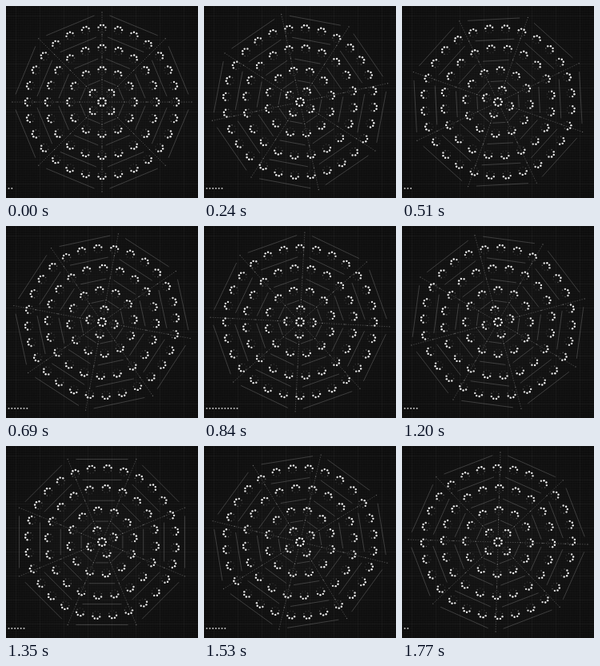
An HTML page with a canvas that plays this animation: 240x240 px, repeating every 1.8 s.

```html
<!DOCTYPE html>
<html lang="en">
<head>
<meta charset="utf-8">
<title>Octagon of spinners</title>
<style>
  html, body { margin: 0; width: 100%; height: 100%; overflow: hidden; background: #111; }
  canvas { display: block; width: 100vw; height: 100vh; }
</style>
</head>
<body>
<canvas id="stage"></canvas>
<script>
const SIZE = 240, MID = 120, LOOP = 1800, STEP = 30, TAU = Math.PI * 2;
const canvas = document.getElementById('stage');
const ctx = canvas.getContext('2d');
const scale = window.devicePixelRatio || 1;
canvas.width = canvas.height = SIZE * scale;

// Spinner rings: radius, number of spinners, starting angle.
const RINGS = [
  { r: 15, n: 4, start: TAU / 8 },
  { r: 39, n: 12, start: 0 },
  { r: 66.5, n: 20, start: 0 },
  { r: 91.5, n: 28, start: 0 }
];
const WEB = [28, 56, 84, 112];

// Drift of the outer ring in spinner spacings, and length of the dotted bar.
const DRIFT = [[0, 0], [240, .32], [510, .46], [840, 1], [1200, 1.18], [1530, 1.54], [1800, 2]];
const BAR = [[0, 2], [240, 6], [510, 3], [840, 11], [1200, 5], [1530, 7], [1770, 2], [1800, 2]];

function sample(table, t) {
  const i = table.findIndex(row => row[0] > t);
  const [t0, a] = table[i - 1], [t1, b] = table[i];
  return a + (b - a) * (t - t0) / (t1 - t0);
}

// Angles run clockwise from the top.
const polar = (r, a) => [r * Math.sin(a), -r * Math.cos(a)];

function dot(x, y, r, alpha) {
  ctx.fillStyle = `rgba(255,255,255,${alpha})`;
  ctx.beginPath();
  ctx.arc(x, y, r, 0, TAU);
  ctx.fill();
}

function line(x0, y0, x1, y1) {
  ctx.beginPath();
  ctx.moveTo(x0, y0);
  ctx.lineTo(x1, y1);
  ctx.stroke();
}

function backdrop() {
  const glow = ctx.createRadialGradient(MID, MID, 20, MID, MID, 170);
  glow.addColorStop(0, '#141414');
  glow.addColorStop(1, '#0d0d0d');
  ctx.fillStyle = glow;
  ctx.fillRect(0, 0, SIZE, SIZE);
  ctx.fillStyle = 'rgba(255,255,255,.012)';
  for (let p = 0; p < SIZE; p += 3) {
    ctx.fillRect(p, 0, 1, SIZE);
    ctx.fillRect(0, p, SIZE, 1);
  }
  ctx.fillStyle = 'rgba(255,255,255,.03)';
  for (let p = 12; p < SIZE; p += 30) {
    ctx.fillRect(p, 0, 1, SIZE);
    ctx.fillRect(0, p, SIZE, 1);
  }
}

function web(turn) {
  ctx.lineWidth = .7;
  for (let i = 0; i < 8; i++) {
    const a = turn + i * TAU / 8;
    ctx.strokeStyle = 'rgba(255,255,255,.3)';
    ctx.setLineDash([1.5, 1.5]);
    line(...polar(9, a), ...polar(111, a));
    ctx.setLineDash([]);
    ctx.strokeStyle = 'rgba(255,255,255,.27)';
    for (const r of WEB) {
      const [x0, y0] = polar(r, a), [x1, y1] = polar(r, a + TAU / 8);
      const at = k => [x0 + (x1 - x0) * k, y0 + (y1 - y0) * k];
      line(...at(.12), ...at(.88));
      dot(x0, y0, .7, .35);
    }
  }
}

// Eight dots, bright on the side facing away from the centre.
function spinner(r, a) {
  const [x, y] = polar(r, a);
  for (let i = 0; i < 8; i++) {
    const b = (i + .5) * TAU / 8;
    const out = Math.cos(b);
    const [dx, dy] = polar(4.8, a + b);
    const alpha = out > .9 ? .95 : out > 0 ? .85 : out > -.5 ? .3 : .1;
    dot(x + dx, y + dy, out > 0 ? 1.2 : .8, alpha);
  }
}

function draw(t) {
  const turn = -TAU / 4 * t / LOOP;
  ctx.setTransform(scale, 0, 0, scale, 0, 0);
  backdrop();
  ctx.save();
  ctx.translate(MID, MID);
  web(turn);
  for (let i = 0; i < 8; i++) {
    dot(...polar(4.8, turn + (i + .5) * TAU / 8), 1.25, .95);
  }
  RINGS.forEach(({ r, n, start }, k) => {
    const shift = k === 3 ? sample(DRIFT, t) * TAU / n : turn;
    for (let i = 0; i < n; i++) spinner(r, start + shift + i * TAU / n);
  });
  ctx.restore();

  const count = Math.round(sample(BAR, t));
  for (let i = 0; i < count; i++) dot(3.5 + i * 3.8, 228, 1, .75);
}

const begin = performance.now();
function tick() {
  const t = (performance.now() - begin) % LOOP;
  draw(Math.floor(t / STEP) * STEP);
  requestAnimationFrame(tick);
}
tick();
</script>
</body>
</html>
```
